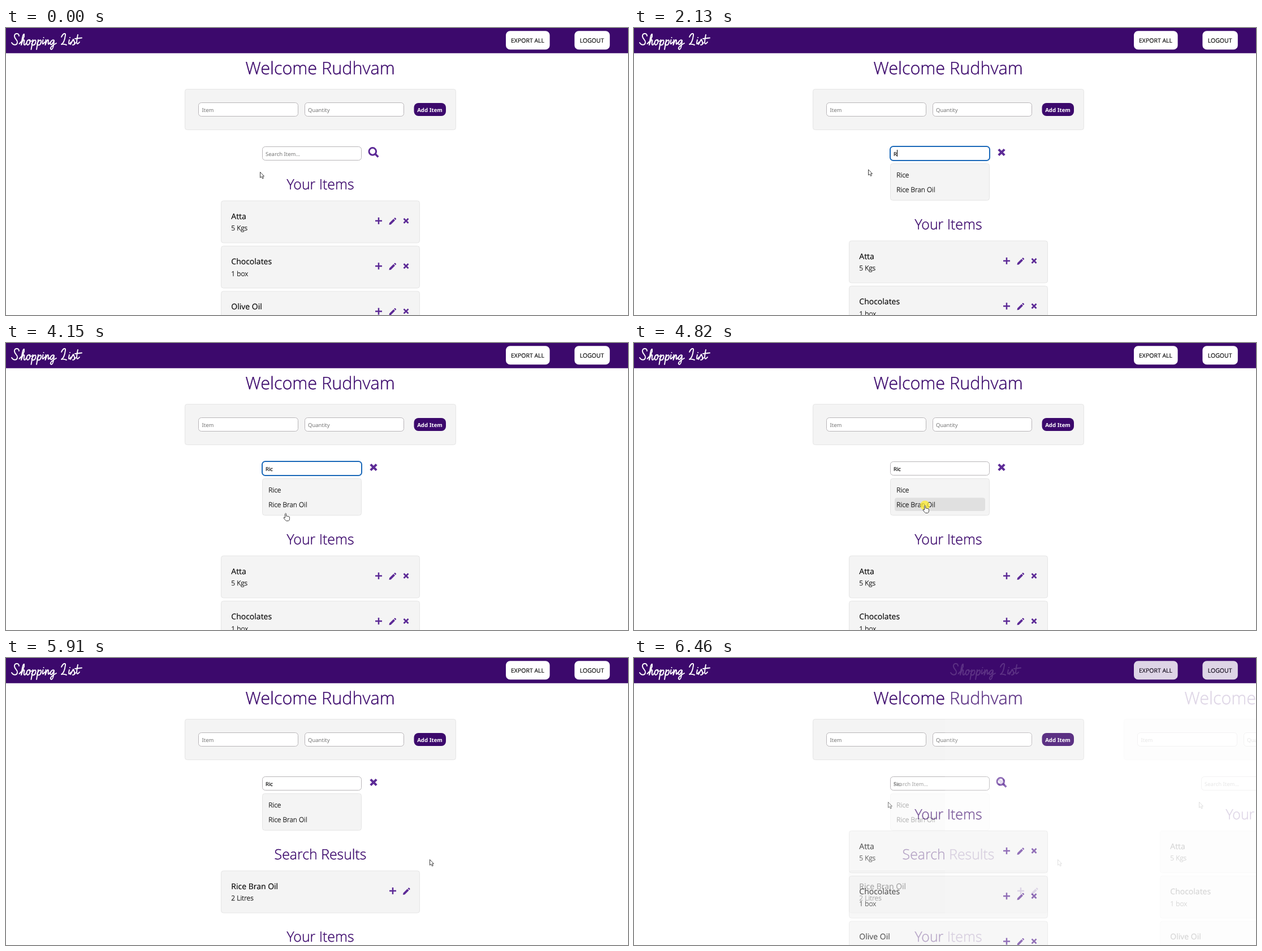
An HTML page that plays this animation: 1100x509 px, repeating every 6530 ms.

```html
<!DOCTYPE html>
<html lang="en">
<head>
<meta charset="utf-8">
<title>Shopping List</title>
<style>
  html, body { margin: 0; width: 100%; height: 100%; overflow: hidden; background: #fff; }
  svg { display: block; }
  text { font-family: "Open Sans", sans-serif; text-rendering: geometricPrecision; white-space: pre; }
  .title { font-size: 30.6px; font-weight: 300; fill: #3c096c; stroke: #3c096c; stroke-width: .4; }
  .head { font-size: 24.9px; font-weight: 300; fill: #3c096c; stroke: #3c096c; stroke-width: .4; text-anchor: middle; }
  .name { font-size: 14px; fill: #000; stroke: #000; stroke-width: .15; }
  .qty { font-size: 12px; font-weight: 300; fill: #000; stroke: #000; stroke-width: .25; }
  .nav { font-size: 10.5px; fill: #000; stroke: #000; stroke-width: .15; }
  .field { font: 9.5px "Noto Sans", sans-serif; fill: #000; stroke: #000; stroke-width: .15; }
  .hint { font: 9.5px "Noto Sans", sans-serif; fill: #757575; }
  .add { font: bold 9.7px "Noto Sans", sans-serif; fill: #fff; }
  .panel { fill: #f4f4f4; stroke: #e5e5e5; }
  .input { fill: #fff; stroke: #b8b5b8; }
  .focus { fill: #fff; stroke: #1a68b8; stroke-width: 2; }
  .line { fill: none; stroke: #5c2a96; }
  .logo { fill: none; stroke: #fff; stroke-width: 1.9; stroke-linecap: round; stroke-linejoin: round; }
  .cursor { fill: #fff; stroke: #2b2b2b; stroke-width: .9; stroke-linejoin: round; }
</style>
</head>
<body>
<svg id="stage" width="1100" height="509" viewBox="0 0 1100 509">
  <g id="live"></g>
  <svg id="ghost" x="550" width="550" height="509" overflow="hidden" opacity=".5"></svg>
  <g id="next"></g>
</svg>
<script>
const LOOP = 6530, STEP = 70, PURPLE = '#3c096c';
const $ = id => document.getElementById(id);

const rect = (x, y, w, h, r, attr) =>
  `<rect x="${x}" y="${y}" width="${w}" height="${h}" rx="${r}" ${attr}/>`;
const text = (cls, x, y, s) => `<text class="${cls}" x="${x}" y="${y}">${s}</text>`;
const line = (d, w) => `<path class="line" d="${d}" stroke-width="${w}"/>`;
const at = (x, y, s) => `<g transform="translate(${x} ${y})">${s}</g>`;

// Handwritten heading, one pen stroke per letter
const pen = {
  S: 'M13-16C13-22 4-21 5-15S11-9 10-4 3 1 0-4',
  h: 'M-1-2Q9-12 7.5-19Q5-20 2.5 0Q6-12 8-8Q6 1 9 0L12-4',
  o: 'M5-9C-1-9-1 0 2 0S8-9 5-9Q5-5 9-7',
  p: 'M3-9L0 8M1-2C4-9 9-11 8-5S3 1 1-1',
  i: 'M2-9Q-1 3 5-5M3-13h.1',
  n: 'M2-9L1 0Q5-12 6.5-8Q5 3 9-4',
  g: 'M7-8C3-11-1-3 1-1S6-5 7-8Q6 8 2 8Q-3 5 11-3',
  L: 'M1-14C4-21 9-22 8-17Q6-3 1-1Q4-2 10 0',
  s: 'M-1-1L4-10Q9 0 3 0M6-1L8-4',
  t: 'M4-18Q-1 5 7-5M-1-11L11-12.5'
};
const advance = { S: 14.5, h: 12, o: 8, p: 9.5, i: 5, n: 9.5, g: 10, L: 13, s: 8, ' ': 9 };
function script(word, x, y) {
  let out = '';
  for (const c of word) {
    if (pen[c]) out += at(x, y, `<path d="${pen[c]}"/>`);
    x += advance[c];
  }
  return `<g class="logo" role="img" aria-label="${word}">${out}</g>`;
}

const plus = (x, y) => at(x, y, line('M-6 0H6M0-6V6', 2.5));
const cross = (x, y, r, w) => at(x, y, line(`M${-r} ${-r}L${r} ${r}M${r} ${-r}L${-r} ${r}`, w));
const pencil = (x, y) => at(x, y, '<path fill="#5c2a96" d="M-6 6L-5.5 2.8L1.8-4.5L4.5-1.8L-2.8 5.5Z' +
  'M2.6-5.3L3.8-6.4Q4.6-6.8 5.2-6.2L6.2-5.2Q6.8-4.6 6.4-3.8L5.3-2.6Z"/>');
const lens = '<circle class="line" cx="648.3" cy="218.9" r="6.3" stroke-width="3"/>' +
  line('M653 223.6L658.3 228.8', 3.5);

const pointers = {
  arrow: '<path class="cursor" d="M0 0V10L2.3 8L4 11.6L5.8 10.8L4.2 7.4H7Z"/>',
  beam: '<path d="M-2.5-4.5H-.5L0-4L.5-4.5H2.5M0-4V5M-2.5 5.5H-.5L0 5L.5 5.5H2.5" fill="none" stroke="#333" stroke-width=".9"/>',
  hand: '<path class="cursor" d="M-1 8V1Q0-1 1.2 1V5.2Q2.6 4.2 3.4 5.6Q4.8 4.8 5.5 6Q7 5.6 7 7.4V9.5' +
    'Q7 13 5 13.5H1Q-1 12-3.6 8Q-3.4 6.4-1 8Z"/>'
};

const card = (y, name, qty) =>
  rect(380.5, y + .5, 351, 74.5, 4, 'class="panel"') +
  text('name', 398.3, y + 33, name) + text('qty', 398.3, y + 53.3, qty);

const list = y => text('head', 556, y - 20, 'Your Items') +
  [['Atta', '5 Kgs'], ['Chocolates', '1 box'], ['Olive Oil', '1 Litre']].map((item, i) => {
    const top = y + i * 80.2;
    return card(top, ...item) + plus(659, top + 36) + pencil(683.5, top + 37) + cross(707.5, top + 36, 4, 2.7);
  }).join('');

const results = text('head', 556, 357, 'Search Results') + card(377, 'Rice Bran Oil', '2 Litres') +
  plus(684, 413) + pencil(708, 414) + text('head', 556, 503, 'Your Items');

const frame = rect(0, 0, 1100, 509, 0, 'fill="#fff"') + rect(0, 0, 1100, 44.7, 0, `fill="${PURPLE}"`) +
  script('Shopping List', 10, 30) +
  rect(884, 5.3, 77.6, 33, 7.5, 'fill="#fff"') + text('nav', 893, 25.6, 'EXPORT ALL') +
  rect(1005.4, 5.3, 62.4, 33, 7.5, 'fill="#fff"') + text('nav', 1014.8, 25.6, 'LOGOUT') +
  text('title', 423.5, 82, 'Welcome Rudhvam') +
  rect(316.5, 108.5, 479, 72, 4, 'class="panel"') +
  rect(340.5, 132.5, 176, 24, 5, 'class="input"') + text('hint', 346.5, 148.5, 'Item') +
  rect(528.5, 132.5, 175, 24, 5, 'class="input"') + text('hint', 534, 148.5, 'Quantity') +
  rect(721.5, 133, 56.5, 23, 8, `fill="${PURPLE}"`) + text('add', 727.2, 148.6, 'Add Item');

function searchBox({ focus, typed, caret, hover }) {
  let out = focus ? rect(453, 210, 176, 25, 5.5, 'class="focus"') : rect(453.5, 210.5, 175, 24, 5, 'class="input"');
  out += typed ? text('field', 459, 226.5, typed) : text('hint', 459, 226.5, 'Search Item...');
  if (caret) out += rect(caret, 216, 1, 12, 0, 'fill="#000"');
  if (!typed) return out + lens;
  return out + cross(650, 220.5, 5.2, 4) + rect(453.5, 240.5, 175, 65, 4, 'class="panel"') +
    (hover ? rect(461, 274.5, 160, 23.5, 4, 'fill="#e0e0e0"') : '') +
    text('qty', 464.3, 264.5, 'Rice') + text('qty', 464.3, 290.5, 'Rice Bran Oil');
}

function scene(s) {
  return frame + searchBox(s) + (s.found ? results : list(s.typed ? 377 : 306)) +
    (s.glow ? `<circle cx="${s.x}" cy="${s.y}" r="8.5" fill="#ffee30" opacity=".75"/>` : '') +
    at(s.x, s.y, pointers[s.pointer]);
}

// Pointer moves: start, steps, end x, end y
const moves = [
  [720, 1, 459.5, 240], [980, 3, 496, 223], [1450, 3, 414.5, 251],
  [3800, 6, 494.5, 302], [4280, 3, 514.5, 288], [5490, 7, 749.5, 357.5]
];
// Typed text and caret position by time
const typing = [[0, ''], [2130, 'R'], [2650, 'Ri'], [2720, 'Ric']];
const carets = [
  [0, 0], [1320, 459], [1860, 0], [2130, 465], [2390, 0], [2650, 468], [2720, 472],
  [2870, 0], [3400, 472], [3940, 0], [4490, 472], [4820, 0]
];

const last = (table, t) => table.filter(row => row[0] <= t).pop()[1];
const within = (t, a, b) => t >= a && t < b;

function position(t) {
  let x = 449.5, y = 255.5;
  for (const [start, steps, ex, ey] of moves) {
    if (t < start) break;
    const p = Math.min(1, (Math.floor((t - start) / STEP) + 1) / steps);
    const e = p * p * (3 - 2 * p);
    x += (ex - x) * e;
    y += (ey - y) * e;
  }
  return { x, y };
}

function stateAt(t) {
  const { x, y } = position(t), typed = last(typing, t);
  const inside = x > 453 && x < 629;
  return {
    x, y, typed,
    caret: last(carets, t),
    focus: within(t, 1320, 4820),
    glow: within(t, 1320, 1450) || within(t, 4820, 4960),
    found: t >= 4890,
    hover: typed && x > 461 && x < 621 && y > 274 && y < 298,
    pointer: inside && y > 209 && y < 236 ? 'beam' : inside && typed && y > 240 && y < 306 ? 'hand' : 'arrow'
  };
}

const first = scene(stateAt(0));
$('ghost').innerHTML = $('next').innerHTML = first;

let shown = '';
function render(t) {
  const markup = scene(stateAt(t));
  if (markup !== shown) $('live').innerHTML = shown = markup;
  const fade = t < 6320 ? 0 : Math.floor((t - 6320) / STEP) / 3;
  $('ghost').style.display = t < 6320 ? 'none' : '';
  $('next').style.display = fade ? '' : 'none';
  $('next').setAttribute('opacity', fade);
}

const begin = performance.now();
function tick() {
  render((performance.now() - begin) % LOOP);
  requestAnimationFrame(tick);
}
tick();
</script>
</body>
</html>
```
